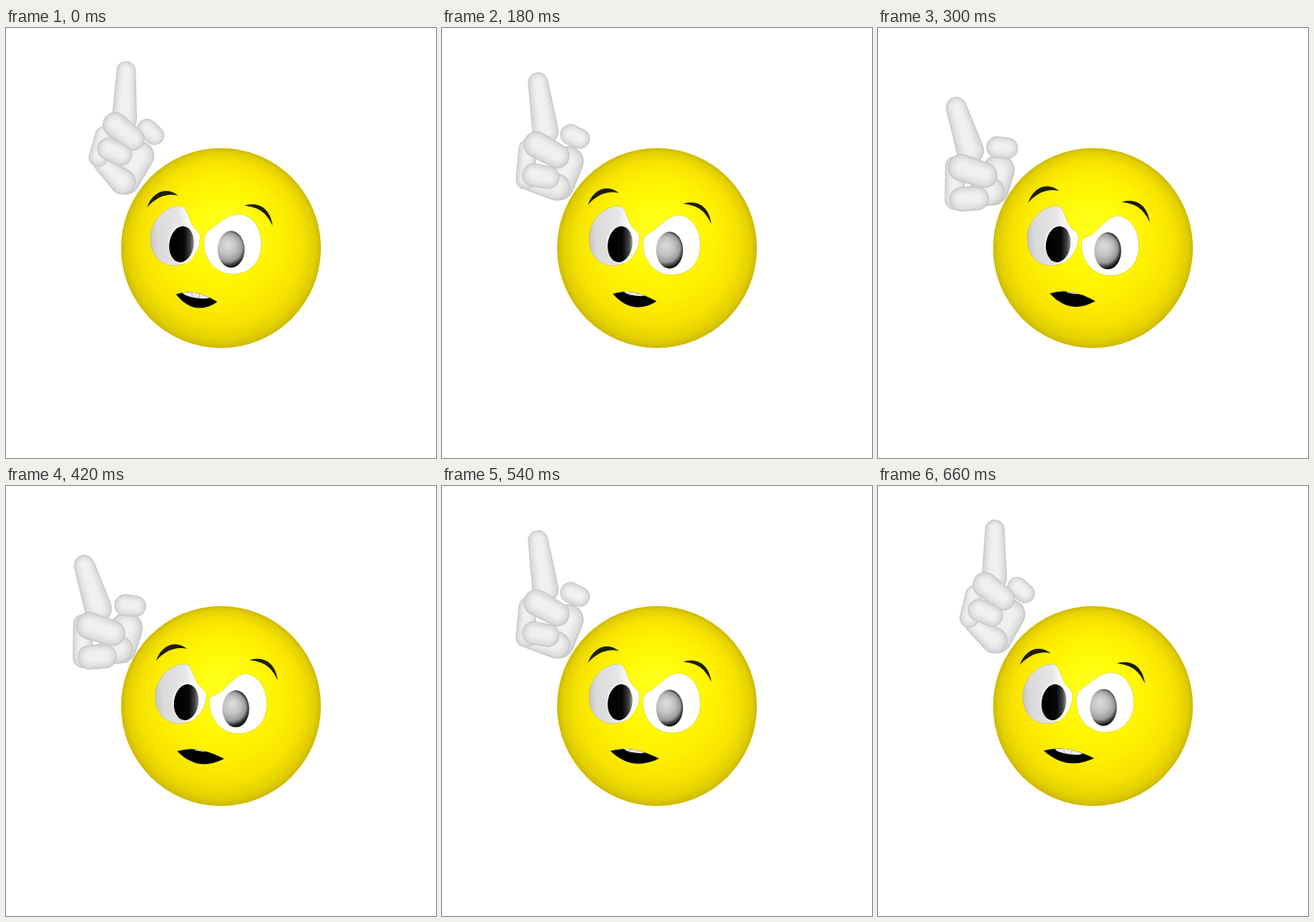
An HTML page with a canvas that plays this animation: 512x512 px, repeating every 0.72 s.

```html
<!DOCTYPE html>
<html lang="en">
<head>
<meta charset="utf-8">
<title>Wagging finger</title>
<style>
  html, body { margin: 0; width: 100%; height: 100%; overflow: hidden; background: #fff; }
  canvas { display: block; width: 512px; height: 512px; }
</style>
</head>
<body>
<canvas id="stage" width="512" height="512"></canvas>
<script>
const ctx = document.getElementById('stage').getContext('2d');
const LOOP = 720, STEP = 60;
const WRIST_Y = 181, MAX_PITCH = 0.86;
const BROW = '#1c1c10';

const joint = (x, height, depth, r) => ({ x, height, depth, r });

// Limbs of the upright hand, back to front; height and depth are
// measured from the wrist, depth pointing at the viewer.
const HAND = {
  finger: [joint(143, 130, -10, 11.5), joint(141, 73, 6, 15)],
  palm: [joint(142, 0, 0, 17.5), joint(159, 29, -4, 17.5)],
  heel: [joint(114, 19, 36, 9.5), joint(139, -2, 1, 15.5)],
  side: [joint(116, 54, 13, 10), joint(110, 27, 43, 11.5)],
  thumb: [joint(168, 61, -11, 12), joint(177, 53, -17, 11.5)],
  knuckle: [joint(130, 66, 28, 15), joint(151, 49, 24, 14)],
  curl: [joint(122, 37, 52, 13.5), joint(137, 30, 44, 13)]
};

const mix = (a, b, k) => a + (b - a) * k;

// The hand pitches forward about the wrist and leans to the left.
function project({ x, height, depth, r }, p) {
  const sin = Math.sin(MAX_PITCH * p), cos = Math.cos(MAX_PITCH * p);
  return {
    x: x - 6 * p - (0.48 * height + 0.1 * depth) * sin,
    y: WRIST_Y + 12 * p - height * cos + depth * sin,
    r: r * (1 + 0.1 * p)
  };
}

function addStops(gradient, stops) {
  stops.forEach(([at, color]) => gradient.addColorStop(at, color));
  return gradient;
}
const radial = (box, ...stops) => addStops(ctx.createRadialGradient(...box), stops);
const linear = (box, ...stops) => addStops(ctx.createLinearGradient(...box), stops);

function ellipse(x, y, rx, ry, fill, tilt = 0) {
  ctx.beginPath();
  ctx.ellipse(x, y, rx, ry, tilt, 0, Math.PI * 2);
  ctx.fillStyle = fill;
  ctx.fill();
}

function shape(d, fill, stroke) {
  const path = new Path2D(d);
  ctx.fillStyle = fill;
  ctx.fill(path);
  if (stroke) {
    ctx.strokeStyle = stroke;
    ctx.stroke(path);
  }
}

function shifted(dx, dy, draw) {
  ctx.save();
  ctx.translate(dx, dy);
  draw();
  ctx.restore();
}

// Rounded shading comes from stacked, shrinking, ever lighter capsules.
function capsule(from, to) {
  const layers = 9;
  const angle = Math.atan2(to.y - from.y, to.x - from.x);
  const length = Math.hypot(to.x - from.x, to.y - from.y);
  for (let i = 0; i < layers; i++) {
    const k = i / (layers - 1), size = 1 - 0.68 * k;
    const a = from.r * size, b = to.r * size;
    const spread = Math.acos((a - b) / length);
    const light = Math.round(mix(200, 240, Math.sqrt(k)));
    ctx.beginPath();
    ctx.arc(from.x, from.y - k, a, angle + spread, angle - spread + Math.PI * 2);
    ctx.arc(to.x, to.y - k, b, angle - spread, angle + spread);
    ctx.closePath();
    ctx.fillStyle = `rgb(${light},${light},${light})`;
    ctx.fill();
  }
}

function drawHand(p) {
  for (const limb of Object.values(HAND)) {
    capsule(...limb.map(end => project(end, p)));
  }
}

function drawBall() {
  ellipse(256, 262, 119, 119, radial([256, 228, 0, 256, 262, 119],
    [0, '#ffff1c'], [0.3, '#fffb08'], [0.6, '#fff000'],
    [0.82, '#f6e200'], [0.94, '#e4d000'], [1, '#cdb900']));
}

function drawLeftEye(p) {
  const right = 231 + 2 * p;
  const white = linear([172, 250, right, 246],
    [0, '#c6c6c6'], [0.15, '#dadada'], [0.6, '#e6e6e6'], [0.82, '#fff'], [1, '#fff']);
  shape('M207 212C188 212 172 231 172 251C172 270 184 283 201 283' +
    `C218 283 ${right} 268 ${right} 249C${right} 242 225 241 221 233C216 223 215 212 207 212Z`,
    white, 'rgba(130,120,40,0.2)');
  ellipse(210, 257.5, 17, 23, '#f8f8f8');
  ellipse(209, 257.5, 14.6, 21.5, linear([194, 257, 224, 257],
    [0, '#000'], [0.6, '#060606'], [0.85, '#444'], [1, '#999']), 0.14);
}

function drawRightEye(p) {
  const lid = 5 * p;
  shape(`M236 257C236 250 237 ${244 + lid} ${243 + lid} ${240 + lid}` +
    `C${250 + lid} ${236 + lid} ${263 + lid / 2} ${222 + lid / 2} 277 222` +
    'C294 222 304 239 304 258C304 279 290 293 270 293C250 293 236 276 236 257Z',
    '#fff', 'rgba(130,120,40,0.2)');
  shifted(-p, 0, () => ellipse(268, 263.5, 16, 22, radial([264, 257, 0, 264 - 2 * p, 262, 23],
    [0, '#dedede'], [0.45, '#c2c2c2'], [0.75, '#999'], [0.88, '#4a4a4a'], [1, '#111'])));
}

function drawBrows(p) {
  shifted(11.5 * p, -6 * p, () =>
    shape('M168 213.5C174 196 190 188 205 199.5C192 196.5 180 200.5 168 213.5Z', BROW));
  shifted(6.5 * p, -4.5 * p, () =>
    shape('M284 211.5C302 206 315 216 317.5 235.5C310 220 302 213.5 284 211.5Z', BROW));
}

// The mouth follows the face and stretches wider and flatter during the loop.
function drawMouth(p, progress) {
  const mid = 227 + 5 * p, half = 24.5 + 6 * progress;
  const left = mid - half, right = mid + half;
  const y = 317 - 2 * progress, bottom = 337 - 4 * progress;
  const lips = new Path2D(`M${left} ${y}C${mid - 8} ${y - 6} ${mid + 8} ${y - 1} ${right} ${y + 9}` +
    `C${mid + 9} ${bottom} ${mid - 9} ${bottom} ${left} ${y}Z`);
  const teeth = mix(4, 1.2, p), teethY = y + 0.5 - 2 * p;
  ctx.fillStyle = '#000';
  ctx.fill(lips);
  ctx.save();
  ctx.clip(lips);
  ellipse(mid, teethY, mix(17, 8, p), teeth, '#e9e9e9', 0.15);
  ctx.fillStyle = '#aaa';
  for (const dx of [-6, 3]) ctx.fillRect(mid + dx, teethY - teeth, 0.7, teeth * 2);
  ctx.restore();
}

function draw(now) {
  const progress = Math.floor((now % LOOP) / STEP) * STEP / LOOP;
  const p = (1 - Math.cos(progress * Math.PI * 2)) / 2;
  ctx.fillStyle = '#fff';
  ctx.fillRect(0, 0, 512, 512);
  drawHand(p);
  drawBall();
  shifted(6 * p, 0, () => drawLeftEye(p));
  shifted(7 * p, 2 * p, () => drawRightEye(p));
  drawBrows(p);
  drawMouth(p, progress);
}

const start = performance.now();
function tick() {
  draw(performance.now() - start);
  requestAnimationFrame(tick);
}
tick();
</script>
</body>
</html>
```
